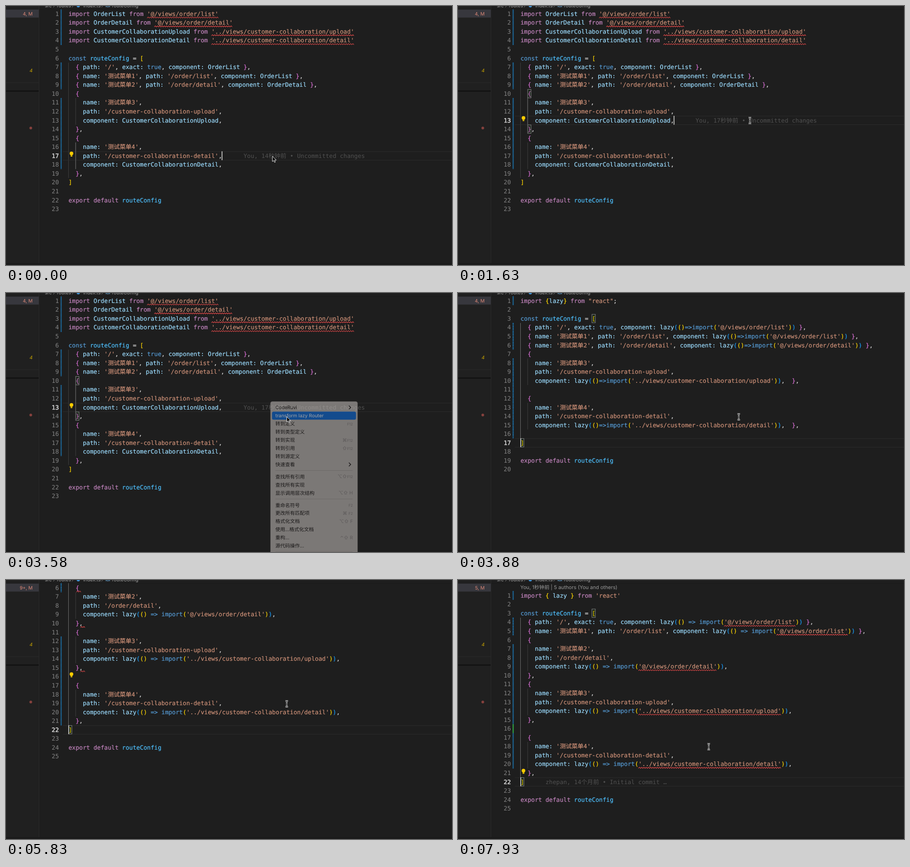
Write an HTML page that moves like this. It is 981 px wide and 571 px high and loops after 8 s.

```html
<!DOCTYPE html>
<html lang="zh-CN">
<head>
<meta charset="utf-8">
<title>Lazy routes</title>
<style>
  html, body { margin: 0; width: 100%; height: 100%; overflow: hidden; background: #1e1e1e; }
  svg { display: block; width: 981px; height: 571px; }
  text { white-space: pre; text-rendering: geometricPrecision; }
  .code { font: 13.05px "DejaVu Sans Mono", "Noto Sans CJK SC", "Noto Sans CJK JP", monospace; stroke-width: .2; }
  .ui { font-family: Inter, "Noto Sans CJK SC", "Noto Sans CJK JP", "DejaVu Sans", sans-serif; }
</style>
</head>
<body>
<svg id="stage" viewBox="0 0 981 571">
  <defs><clipPath id="view"><path d="M73 7.5H981V567H73z"/></clipPath></defs>
</svg>
<script>
const LOOP = 8000, LEFT = 137, TEXT = 137.5, TOP = 17.2, ROW = 19.56, CH = 7.857, WIDE = 13.05;
const stage = document.getElementById('stage');
const tracks = [];

function el(parent, tag, attrs = {}, text) {
  const node = document.createElementNS('http://www.w3.org/2000/svg', tag);
  for (const k in attrs) node.setAttribute(k, attrs[k]);
  if (text !== undefined) node.textContent = text;
  parent.appendChild(node);
  return node;
}
const group = (parent, attrs) => el(parent, 'g', attrs);
const rect = (parent, x, y, width, height, fill, more) =>
  el(parent, 'rect', { x, y, width, height, fill, ...more });
const path = (parent, d, stroke, width = 1, more) =>
  el(parent, 'path', { d, stroke, 'stroke-width': width, fill: 'none', ...more });
const label = (parent, x, y, text, fill, size, more) =>
  el(parent, 'text', { class: 'ui', x, y, fill, 'font-size': size, ...more }, text);

// Held steps: the last [time, value] that has passed applies.
function track(node, steps, attr = 'opacity') {
  tracks.push({ node, steps, attr });
  return node;
}

const rowY = n => TOP + (n - 1) * ROW;
const colX = (line, col) => {
  let x = TEXT;
  for (let i = 0; i < col; i++) x += line.charCodeAt(i) > 0x2e80 ? WIDE : CH;
  return x;
};

// ---- Code ----
const PAIRS = ['#ffd700', '#da70d6', '#179fff'];
const WORDS = { from: '#c586c0', export: '#c586c0', default: '#c586c0', const: '#569cd6', true: '#569cd6', routeConfig: '#4fc1ff' };

function tokenColor(tok, next) {
  if (/^['"]/.test(tok)) return '#ce9178';
  if (tok === '=>') return '#569cd6';
  if (tok === 'import') return next === '(' ? '#569cd6' : '#c586c0';
  if (WORDS[tok]) return WORDS[tok];
  return /^[a-z:]/i.test(tok) ? '#9cdcfe' : '#d4d4d4';
}

function codeText(parent, source) {
  const lines = source.split('\n');
  let depth = 0;
  lines.forEach((line, i) => {
    const y = rowY(i + 1) + 4.6;
    el(parent, 'text', { class: 'code', x: 116.3, y, fill: '#858585', 'text-anchor': 'end' }, i + 1);
    const row = el(parent, 'text', { class: 'code', x: TEXT, y });
    const toks = line.match(/'[^']*'|"[^"]*"|[a-z]+|=>|\s+|./gi) || [];
    toks.forEach((tok, k) => {
      let fill;
      if ('([{'.includes(tok)) fill = PAIRS[depth++ % 3];
      else if (')]}'.includes(tok)) fill = PAIRS[--depth % 3];
      else fill = tokenColor(tok, toks[k + 1]);
      el(row, 'tspan', { fill, stroke: fill }, tok);
    });
  });
  return lines;
}

function guides(parent, lines, bright) {
  const first = lines.findIndex(l => l.endsWith('[')) + 2, last = lines.indexOf(']');
  const bar = (x, a, b, color) => path(parent, `M${x} ${rowY(a) - ROW / 2}V${rowY(b) + ROW / 2}`, color);
  bar(LEFT + .5, first, last, bright ? '#707070' : '#404040');
  lines.forEach((l, i) => l.startsWith('    ') && bar(LEFT + 2 * CH + .5, i + 1, i + 1, '#404040'));
}

function gutter(parent, ranges, color = '#1b81c4', dash = '1.6 .8') {
  for (const [a, b] of ranges)
    path(parent, `M121.3 ${rowY(a) - ROW / 2}V${rowY(b) + ROW / 2}`, color, 2.4, { 'stroke-dasharray': dash });
}

function squiggle(parent, n, x0, x1) {
  const y = rowY(n) + 8.2, half = 2.45;
  let d = `M${x0} ${y + 1.2}`;
  for (let x = x0 + half, up = true; x <= x1; x += half, up = !up) d += `L${x} ${y + (up ? -1.2 : 1.2)}`;
  path(parent, d, '#e84a4a', 1.05);
}
function underline(parent, lines, n, a, b) {
  const line = lines[n - 1];
  squiggle(parent, n, colX(line, a), colX(line, b));
}
function underlinePaths(parent, lines) {
  lines.forEach((line, i) => {
    const m = line.match(/'(@|\.\.)\/[^']*'/);
    if (m) underline(parent, lines, i + 1, m.index, m.index + m[0].length);
  });
}

function focusRow(parent, n) {
  const g = group(parent), y = rowY(n);
  for (const dy of [-9.6, 9.3]) rect(g, 125, y + dy, 856, 1, '#2d2d2d');
  el(g, 'text', { class: 'code', x: 116.3, y: y + 4.6, fill: '#d2d2d2', stroke: '#d2d2d2', style: 'stroke-width:.5', 'text-anchor': 'end' }, n);
  return g;
}
const pairBox = (parent, n, col) =>
  rect(parent, LEFT + col * CH + .5, rowY(n) - 9.3, CH - .4, 18.6, 'rgba(0,100,0,.1)', { stroke: '#888' });
const caret = (parent, n, x) => rect(parent, x, rowY(n) - 9.8, 1.8, ROW, '#c8c8c6');
const blame = (parent, lines, n, text) => el(parent, 'text',
  { class: 'code', x: colX(lines[n - 1], lines[n - 1].length) + 6 * CH, y: rowY(n) + 4.6, fill: '#505050' }, text);
function bulb(parent, n) {
  const g = group(parent, { transform: `translate(144 ${rowY(n) - 5.2})` });
  el(g, 'circle', { r: 4, fill: '#ffcc00' });
  rect(g, -2, 2.5, 4, 4.5, '#ffcc00', { rx: 1 });
  rect(g, -2, 4.4, 4, .7, '#6b5a10');
  return g;
}

const before = `import OrderList from '@/views/order/list'
import OrderDetail from '@/views/order/detail'
import CustomerCollaborationUpload from '../views/customer-collaboration/upload'
import CustomerCollaborationDetail from '../views/customer-collaboration/detail'

const routeConfig = [
  { path: '/', exact: true, component: OrderList },
  { name: '测试菜单1', path: '/order/list', component: OrderList },
  { name: '测试菜单2', path: '/order/detail', component: OrderDetail },
  {
    name: '测试菜单3',
    path: '/customer-collaboration-upload',
    component: CustomerCollaborationUpload,
  },
  {
    name: '测试菜单4',
    path: '/customer-collaboration-detail',
    component: CustomerCollaborationDetail,
  },
]

export default routeConfig
`;
const lazied = `import {lazy} from "react";

const routeConfig = [
  { path: '/', exact: true, component: lazy(()=>import('@/views/order/list')) },
  { name: '测试菜单1', path: '/order/list', component: lazy(()=>import('@/views/order/list')) },
  { name: '测试菜单2', path: '/order/detail', component: lazy(()=>import('@/views/order/detail')) },
  {
    name: '测试菜单3',
    path: '/customer-collaboration-upload',
    component: lazy(()=>import('../views/customer-collaboration/upload')),  },

  {
    name: '测试菜单4',
    path: '/customer-collaboration-detail',
    component: lazy(()=>import('../views/customer-collaboration/detail')),  },

]

export default routeConfig
`;
const formatted = `import { lazy } from 'react'

const routeConfig = [
  { path: '/', exact: true, component: lazy(() => import('@/views/order/list')) },
  { name: '测试菜单1', path: '/order/list', component: lazy(() => import('@/views/order/list')) },
  {
    name: '测试菜单2',
    path: '/order/detail',
    component: lazy(() => import('@/views/order/detail')),
  },
  {
    name: '测试菜单3',
    path: '/customer-collaboration-upload',
    component: lazy(() => import('../views/customer-collaboration/upload')),
  },

  {
    name: '测试菜单4',
    path: '/customer-collaboration-detail',
    component: lazy(() => import('../views/customer-collaboration/detail')),
  },
]

export default routeConfig
`;

// ---- Window chrome ----
rect(stage, 0, 0, 981, 571, '#1e1e1e');
rect(stage, 0, 0, 72, 571, '#202020');
rect(stage, 72, 0, 1, 571, '#2b2b2b');
rect(stage, 73, 7, 908, 1, '#191919');
rect(stage, 0, 567, 981, 4, '#1a1a1a');
rect(stage, 0, 8, 72, 17.5, '#37373d');
rect(stage, 0, 168.5, 72, 1, '#2a2a2a');
rect(stage, 0, 186.5, 72, 2, '#0c0c0c');
el(stage, 'circle', { cx: 54.5, cy: 269, r: 3, fill: '#85413d' });
label(stage, 58.5, 146, '4', '#cca700', 10.5, { 'text-anchor': 'end', 'font-style': 'italic' });

const badge = (text, steps) =>
  track(label(stage, 58.5, 20.5, text, '#e08a78', 10.3, { 'text-anchor': 'end' }), steps);
badge('4, M', [[0, 1], [4030, 0]]);
badge('9+, M', [[4030, 1], [6430, 0]]);
badge('5, M', [[6430, 1]]);

const crumb = (x, text) => label(stage, x, 3, text, '#a0a0a0', 10.4);
crumb(85.5, 'src');
crumb(112, 'routes');
crumb(170, 'index.ts');
crumb(233, 'routeConfig');
for (const x of [104, 145, 210]) path(stage, `M${x} 3l3.5-4`, '#808080');
el(stage, 'circle', { cx: 159, cy: -.5, r: 3.6, fill: '#3f8fd0' });
path(stage, 'M219 1.5h3M226 1.5h3M222 1a2.3 2.3 0 0 0 4 0', '#75beff');

const editor = group(stage, { 'clip-path': 'url(#view)' });

// ---- Before ----
{
  const doc = track(group(editor), [[0, 1], [3880, 0]]);
  const back = group(doc), lines = codeText(doc, before);
  const f17 = track(focusRow(doc, 17), [[0, 1], [1340, 0]]);
  const f13 = track(group(doc), [[1340, 1]]);
  focusRow(f13, 13);
  guides(back, lines, false);
  const mark = (g, a, b) => path(g, `M${LEFT + 2 * CH + .5} ${rowY(a) - ROW / 2}V${rowY(b) + ROW / 2}`, '#707070');
  mark(f17, 16, 18);
  mark(f13, 11, 13);
  pairBox(f13, 10, 2);
  pairBox(f13, 14, 2);
  gutter(doc, [[1, 4], [7, 9], [11, 18]]);
  underlinePaths(doc, lines);
  track(blame(doc, lines, 17, 'You, 14秒钟前 • Uncommitted changes'), [[0, 1], [1340, 0]]);
  track(blame(doc, lines, 13, 'You, 17秒钟前 • Uncommitted changes'), [[1490, 1]]);
  track(bulb(doc, 17), [[0, 1], [1340, 0]]);
  track(bulb(doc, 13), [[1630, 1]]);
  track(caret(doc, 17, 474.3), [[0, 1], [150, 0]]);
  track(caret(doc, 13, 474.3), [[1340, 1], [1780, 0], [2980, 1], [3430, 0]]);
}

// ---- After the transform ----
{
  const doc = track(group(editor), [[3880, 1], [5830, 0]]);
  const back = group(doc), lines = codeText(doc, lazied);
  focusRow(doc, 17);
  guides(back, lines, true);
  pairBox(doc, 3, 20);
  pairBox(doc, 17, 0);
  gutter(doc, [[1, 1], [4, 6], [8, 16]]);
  const errors = track(group(doc), [[4030, 1]]);
  underline(errors, lines, 1, 8, 27);
  for (const n of [4, 5]) underline(errors, lines, n, lines[n - 1].indexOf('=>'), lines[n - 1].indexOf("'))") + 2);
  underline(errors, lines, 6, 3, lines[5].indexOf('))') + 2);
  for (const n of [10, 15]) {
    underline(errors, lines, n, 22, 74);
    underline(errors, lines, n, 76, 78);
  }
  track(bulb(doc, 16), [[4180, 1]]);
  track(blame(doc, lines, 17, 'zhepan, 14个月前 • Initial commit …'), [[4180, 1]]);
  track(caret(doc, 17, LEFT), [[3880, 1], [4480, 0], [4930, 1], [5380, 0]]);
}

// ---- Formatted ----
{
  const shown = track(group(editor), [[5830, 1]]);
  const doc = track(group(shown), [[0, 'translate(0 -97.8)'], [7330, 'translate(0 -40)'], [7480, 'translate(0 17)']], 'transform');
  const back = group(doc), lines = codeText(doc, formatted);
  focusRow(doc, 22);
  guides(back, lines, true);
  pairBox(doc, 3, 20);
  pairBox(doc, 22, 0);
  gutter(track(group(doc), [[0, 1], [6430, 0]]), [[1, 1], [4, 6], [12, 21]]);
  const fresh = track(group(doc), [[6430, 1]]);
  gutter(fresh, [[1, 1], [4, 5], [7, 15], [17, 20]]);
  gutter(fresh, [[16, 16]], '#2ea043', 'none');
  underlinePaths(fresh, lines);
  const stale = track(group(doc), [[0, 1], [6130, 0]]);
  squiggle(stale, 6, 155, 165);
  for (const n of [10, 15]) squiggle(stale, n, 164, 174);
  track(bulb(doc, 16), [[0, 1], [6130, 0]]);
  track(bulb(doc, 21), [[6430, 1]]);
  track(blame(doc, lines, 22, 'zhepan, 14个月前 • Initial commit …'), [[6580, 1]]);
  track(caret(doc, 22, LEFT), [[5830, 1], [6280, 0], [6880, 1], [7330, 0], [7930, 1]]);
  track(label(doc, LEFT, 3.4, 'You, 1秒钟前 | 5 authors (You and others)', '#999', 11.1), [[7780, 1]]);
}

// ---- Context menus ----
function shortcut(parent, x, y, keys) {
  const t = label(parent, x, y + 3.6, undefined, '#858080', 10, { 'text-anchor': 'end' });
  for (const part of keys.match(/F\d+|[A-Z]|[^A-Z]+/g))
    el(t, 'tspan', { 'font-size': /F\d/.test(part) ? 8 : 10.3 }, part);
}
function item(parent, x, y, w, entry, fill) {
  const [text, keys] = entry.split('|');
  label(parent, x + 11, y + 3.9, text, fill, /^[a-z]/i.test(text) ? 10.45 : 10.75);
  if (keys === '>') path(parent, `M${x + w - 19.3} ${y - 4}l4 4l-4 4`, fill, 1.5);
  else if (keys) shortcut(parent, x + w - 10.5, y, keys);
}
function menu(x, y, w, h, entries, steps) {
  const g = track(group(stage), steps);
  rect(g, x, y, w, h, '#bab4b1', { rx: 4.5, stroke: '#55504e', 'stroke-width': .6 });
  let cy = y + 13.4;
  for (const entry of entries) {
    if (entry === '-') {
      rect(g, x + 11, cy - 5, w - 22, 1, '#a09a97');
      cy += 9;
    } else {
      item(g, x, cy, w, entry, '#161414');
      cy += 17.93;
    }
  }
  return g;
}
function highlight(parent, x, y, w, entry, steps) {
  const g = track(group(parent), steps);
  rect(g, x + 3.7, y - 9, w - 7.4, 17.8, '#0d69d8', { rx: 3.5 });
  item(g, x, y, w, entry, '#fff');
}

const TOOL = 'CodeRuvi', tool = TOOL + '|>', lazy = 'transform lazy Router';
const jumps = ['转到定义|F12', '转到类型定义', '转到实现|⌘F12', '转到引用|⇧F12', '转到源定义', '快速查看|>',
  '-', '查找所有引用|⌥⇧F12', '查找所有实现', '显示调用层次结构|⌥⇧ H', '-', '重命名符号|F2'];
const format = ['格式化文档|⌥⇧ F', '使用...格式化文档'];

menu(588, 327, 163.5, 260, [tool, ...jumps, ...format], [[150, 1], [1040, .5], [1190, 0]]);
const second = menu(581.5, 239, 192, 350,
  [tool, lazy, ...jumps, '更改所有匹配项|⌘ F2', ...format, '重构...|⌃⇧ R', '源代码操作...', '-'],
  [[2230, 1], [3580, .6], [3730, 0]]);
highlight(second, 581.5, 252.4, 192, tool, [[2380, 1], [2530, 0]]);
highlight(second, 581.5, 270.4, 192, lazy, [[2530, 1]]);
menu(770, 239, 216.5, 80,
  [`${TOOL}: Add Comment`, `${TOOL}: Interactive mode|⌃⏎`, `${TOOL}: Login`, `${TOOL}: Translation mode|⌃⌥ T`],
  [[2380, 1], [2530, 0]]);

// ---- Pointer ----
const moves = [[0, 586, 331], [450, 598, 319], [600, 622, 293], [750, 648, 266], [890, 659, 254.5],
  [1630, 642, 252], [1780, 612, 250], [1930, 590, 249], [2080, 585, 249], [2530, 613, 271.5], [2680, 617.5, 272.5],
  [6430, 612, 285], [6580, 588, 315], [6730, 560, 345], [6880, 554, 360], [7030, 551.5, 367]];
const pointer = track(group(stage), moves.map(([t, x, y]) => [t, `translate(${x} ${y})`]), 'transform');
const arrow = track(group(pointer), [[0, 1], [1190, 0], [2230, 1], [3730, 0]]);
el(arrow, 'path', { d: 'M0 0V12L2.8 9.5L4.7 13.8L6.6 13L4.8 8.8H8.6z', fill: '#0a0a0a', stroke: '#eee', 'stroke-width': 1 });
const beam = track(group(pointer), [[1190, 1], [2230, 0], [3730, 1]]);
const shape = 'M-2.8-6Q0-6 0-4.5Q0-6 2.8-6M0-4.5V5.5M-2.8 7Q0 7 0 5.5Q0 7 2.8 7M-1.5 1.2H1.5';
path(beam, shape, '#e4e4e4', 2.8);
path(beam, shape, '#101010', 1);

// ---- Clock ----
const start = performance.now();
function render() {
  const now = (performance.now() - start) % LOOP;
  for (const tr of tracks) {
    let value = 0;
    for (const [t, v] of tr.steps) if (t <= now) value = v;
    if (tr.last !== value) tr.node.setAttribute(tr.attr, tr.last = value);
  }
  requestAnimationFrame(render);
}
render();
</script>
</body>
</html>
```
